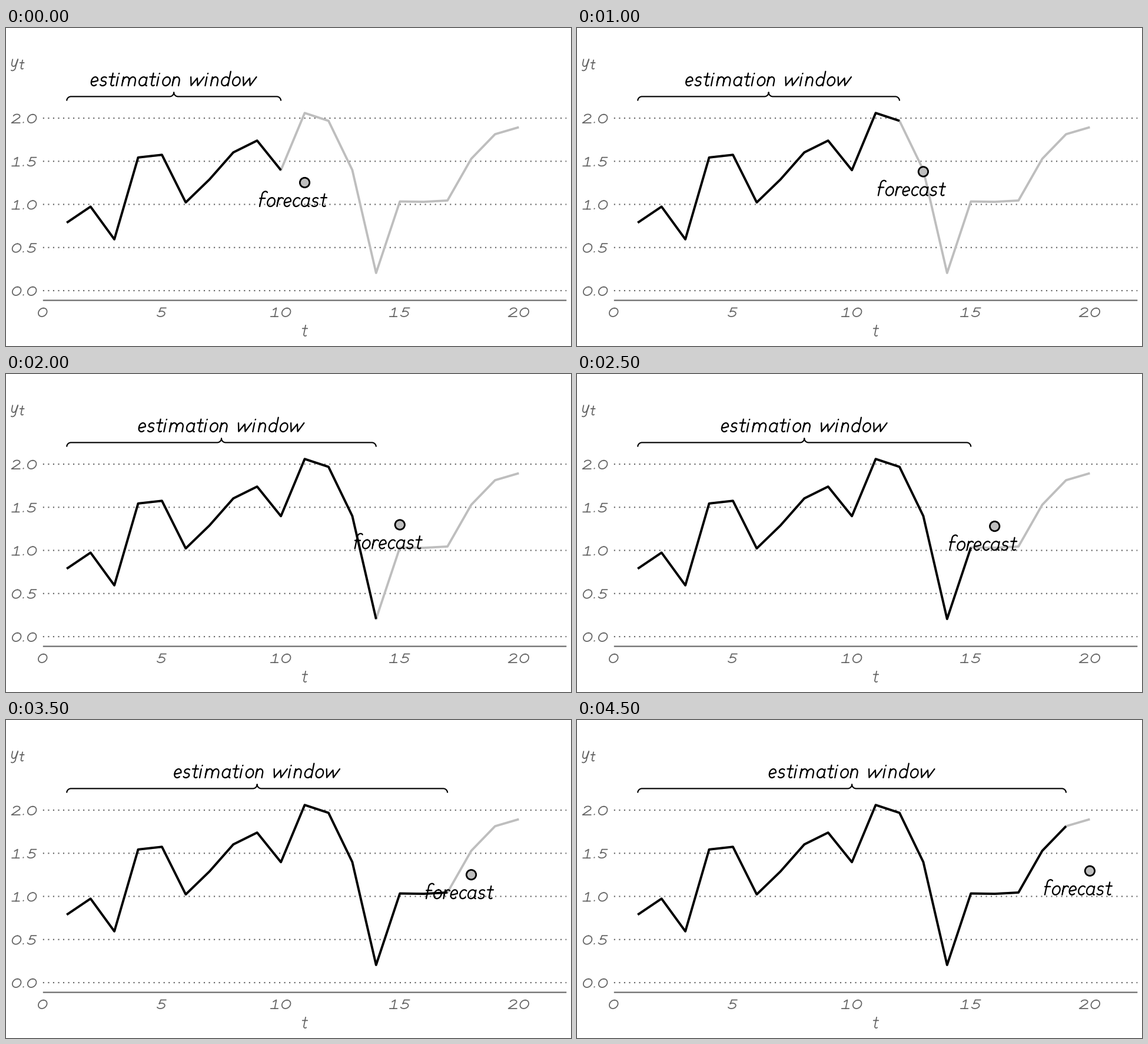
Write a matplotlib script that moves like this. It is 960 by 540 pixels and loops after 5 s.

```python
import numpy as np
import matplotlib.pyplot as plt
from matplotlib.animation import FuncAnimation
from matplotlib.patches import Circle, PathPatch
from matplotlib.path import Path
from matplotlib.transforms import Affine2D

W, H, DPI = 960, 540, 100
INK, GREY, PALE = "black", "#666666", "#bebebe"
SLANT = 0.2
RULE = 2.134
SERIES = np.array([
    0.788, 0.974, 0.595, 1.544, 1.575, 1.023, 1.290, 1.603, 1.740, 1.397,
    2.060, 1.969, 1.399, 0.205, 1.034, 1.030, 1.045, 1.529, 1.814, 1.895])
TIMES = np.arange(1, 21)
FIRST = 10


def px(t):
    return 62.8 + 40.43 * np.asarray(t)


def py(v):
    return 446 - 146.45 * np.asarray(v)


def pt(width):
    return width * 72 / DPI


# Pen strokes, baseline at y = 0, y upwards, x-height 15
def line(*pts):
    return np.array(pts, float)


def arc(cx, cy, rx, ry, start, end):
    a = np.radians(np.linspace(start, end, 28))
    return np.column_stack([cx + rx * np.cos(a), cy + ry * np.sin(a)])


def join(*parts):
    return np.vstack(parts)


def hump(x, rx=5.3):
    return join(line((x, 6)), arc(x + rx, 8, rx, 7, 180, 0),
                line((x + 2 * rx, 0)))


def dot(x, y):
    return line((x, y), (x + 0.3, y + 0.7))


STEM = line((1.5, 15), (1.5, 0))
BOWL = arc(7, 7.5, 6.2, 7.5, 45, 345)

# glyph: advance, strokes
GLYPHS = {
    " ": (12, []),
    ".": (7.5, [dot(2, 0.4)]),
    "a": (18, [BOWL, join(line((12.8, 14.5), (12.6, 3)),
                          arc(15, 3, 2.4, 3, 180, 270))]),
    "c": (14, [arc(6.8, 7.5, 6, 7.5, 50, 315)]),
    "d": (19, [BOWL, line((13, 24.5), (13, 0))]),
    "e": (16, [join(line((1.6, 6.5), (6, 7)),
                    arc(6.6, 8, 5.4, 7, 5, 180),
                    arc(6.9, 7, 5.7, 7, 180, 312))]),
    "f": (13, [join(arc(6.6, 20.8, 4.6, 5, 40, 180), line((1.8, 0))),
               line((-0.8, 14), (8.5, 14))]),
    "i": (9.5, [STEM, dot(1.8, 20.5)]),
    "m": (29, [STEM, hump(1.5, 5.4), hump(12.3, 5.4)]),
    "n": (18, [STEM, hump(1.5)]),
    "o": (17, [arc(7, 7.5, 6.2, 7.5, 90, 450)]),
    "r": (11.5, [STEM, join(line((1.5, 6)),
                            arc(6.5, 8, 5, 7, 180, 50))]),
    "s": (15, [join(arc(6.2, 11.3, 4.6, 3.7, 40, 250),
                    arc(5.8, 3.9, 5, 3.9, 65, -150))]),
    "t": (13, [join(line((4.5, 21.5)), arc(7.8, 3.8, 3.3, 3.8, 180, 310)),
               line((-0.5, 15), (9.5, 15))]),
    "w": (26.5, [line((0.5, 15), (3.8, 0.3), (11.8, 13), (15, 0.3),
                      (23, 15))]),
    "y": (16, [join(line((1.5, 15)), arc(6, 7, 4.5, 6, 180, 330),
                    line((12, 15))),
               join(line((12, 15), (10.5, 1)),
                    arc(5.5, -2, 5, 5.5, 0, -120))]),
    "0": (18.5, [arc(8, 7.2, 7.2, 7.2, 90, 450)]),
    "1": (18.5, [line((3.5, 11.5), (8.3, 14.6), (8.3, 0)),
                 line((1.5, 0), (14, 0))]),
    "2": (18.5, [join(arc(7, 10.8, 5.6, 3.8, 165, -35),
                      line((0.8, 0), (15, 0)))]),
    "5": (18.5, [join(line((14, 14.6), (5, 14.6), (3.8, 8)),
                      arc(7.2, 4.6, 6.6, 4.6, 125, -150))]),
}


def lettering(text, size=1.0, anchor=0.5):
    """Pen path of a text, its ink aligned at x = 0 by anchor."""
    verts, codes, pen = [], [], 0
    for ch in text:
        advance, strokes = GLYPHS[ch]
        for s in strokes:
            verts.append(s @ [[1, 0], [SLANT, 1]] + [pen, 0])
            codes += [Path.MOVETO] + [Path.LINETO] * (len(s) - 1)
        pen += advance
    xy = np.vstack(verts)
    lo, hi = xy[:, 0].min() - 1, xy[:, 0].max() + 1
    xy[:, 0] -= lo + anchor * (hi - lo)
    return Path(xy * [size, -size], codes)


def moved(path, x, y):
    return path.transformed(Affine2D().translate(x, y))


def stroke(path, color, width):
    return ax.add_patch(PathPatch(
        path, fill=False, ec=color, lw=pt(width), capstyle="round",
        joinstyle="round", zorder=5, snap=False))


def write(text, x, y, size=1.0, anchor=0.5):
    stroke(moved(lettering(text, size, anchor), x, y), GREY, 1.8)


def brace(left, right):
    mid, y, r = (left + right) / 2, 116.4, 7.2
    return Path(join(arc(left + r, y + r, r, r, 180, 270),
                     arc(mid - r, y - r, r, r, 90, 0),
                     arc(mid + r, y - r, r, r, 180, 90),
                     arc(right - r, y + r, r, r, 270, 360)))


def rule(y, style="-"):
    ax.plot([62.8, 952.3], [y, y], color=GREY, lw=pt(RULE), ls=style,
            solid_capstyle="butt", dash_capstyle="butt", zorder=1,
            snap=False)


fig = plt.figure(figsize=(W / DPI, H / DPI), dpi=DPI, facecolor="white")
ax = fig.add_axes([0, 0, 1, 1])
ax.set_xlim(0, W)
ax.set_ylim(H, 0)
ax.axis("off")

# Grid, axis and labels
for v in np.arange(0, 2.1, 0.5):
    rule(py(v), (0, (1, 3)))
    write(f"{v:.1f}", 52.5, py(v) + 8, anchor=1)
rule(462.5)
for t in range(0, 21, 5):
    write(str(t), px(t) - 0.5, 490)
write("t", 508, 523, 0.85)
write("y", 8, 66, 0.85, 0)
write("t", 23, 69.5, 0.7, 0)

# Series and moving parts
pen = dict(lw=pt(3.84), solid_capstyle="butt", solid_joinstyle="round",
           snap=False)
ax.plot(px(TIMES), py(SERIES), color=PALE, zorder=2, **pen)
known, = ax.plot([], [], color=INK, zorder=3, **pen)
marker = ax.add_patch(Circle((0, 0), 8.2, fc=PALE, ec=INK, lw=pt(2.8),
                             zorder=4))
WINDOW = lettering("estimation window", 0.99)
FORECAST = lettering("forecast", 0.99)
window_text = stroke(WINDOW, INK, 2.3)
forecast_text = stroke(FORECAST, INK, 2.3)
bracket = stroke(brace(px(1), px(FIRST)), INK, RULE)
bracket.set_capstyle("butt")


def draw(i):
    n = FIRST + i
    x, y = px(n + 1), py(SERIES[:n].mean())
    known.set_data(px(TIMES[:n]), py(SERIES[:n]))
    marker.center = (x, y)
    forecast_text.set_path(moved(FORECAST, x - 19.5, y + 40.5))
    bracket.set_path(brace(px(1), px(n)))
    window_text.set_path(moved(WINDOW, px((n + 1) / 2), 98))
    return known, marker, forecast_text, bracket, window_text


anim = FuncAnimation(fig, draw, frames=10, interval=500, repeat=True,
                     repeat_delay=0)
plt.show()
```
